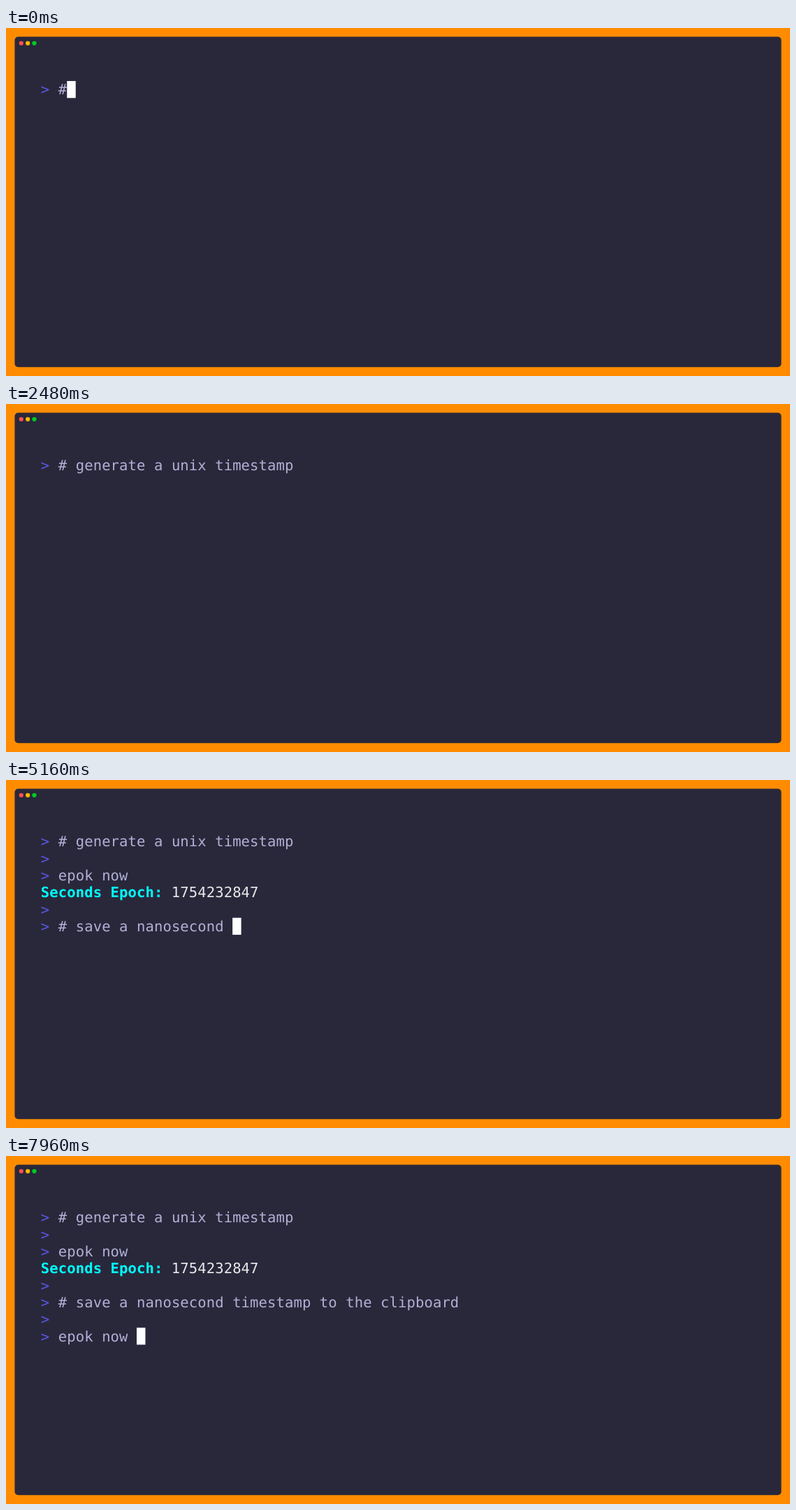
Write an HTML page that moves like this. It is 1122 px wide and 499 px high and loops after 8 s.

```html
<!DOCTYPE html>
<html lang="en">
<head>
<meta charset="utf-8">
<title>Terminal</title>
<style>
  html, body { margin: 0; width: 100%; height: 100%; overflow: hidden; background: #ff8c00; }
  svg { display: block; width: 1122px; height: 499px; }
  text {
    font: 33px "DejaVu Sans Mono", monospace;
    letter-spacing: 0.134px;
    white-space: pre;
    text-rendering: geometricPrecision;
    fill: #b3b0d6;
  }
  .prompt { fill: #5b56e0; }
  .label { fill: #00ffff; font-weight: bold; }
  .value { fill: #e8e8e8; }
</style>
</head>
<body>
<svg viewBox="0 0 1800 800" preserveAspectRatio="xMinYMin meet">
  <rect x="20" y="20" width="1760" height="760" rx="8" fill="#29283b"/>
  <circle cx="35" cy="35" r="5" fill="#ff4f4d"/>
  <circle cx="50" cy="35" r="5" fill="#febb00"/>
  <circle cx="65" cy="35" r="5" fill="#00cc1d"/>
  <g id="screen"></g>
  <rect id="cursor" width="20" height="39" fill="#fff"/>
</svg>
<script>
const LOOP = 8000, TICK = 40;
const CELL = 20, LINE = 39, LEFT = 80, TOP = 122, BASELINE = 31;
const screen = document.getElementById('screen');
const cursor = document.getElementById('cursor');
const snap = ms => Math.ceil(ms / TICK - 1e-6) * TICK;

// open: cursor enters the row; ready: its prompt or output appears; key(n): time of the nth character
const rows = [
  { open: 0, text: '# generate a unix timestamp', key: n => n < 2 ? 0 : 80 + snap((n - 2) * 56) },
  { open: 2520 },
  { open: 2600, text: 'epok now', key: n => 2520 + snap((n + 1) * 520 / 9) },
  { open: 4080, ready: 4120, output: ['Seconds Epoch:', '1754232847'] },
  { open: 4120 },
  { open: 4160, text: '# save a nanosecond timestamp to the clipboard',
    key: n => Math.max(4160 + n * TICK, snap(4098.8 + n * 50.6)) },
  { open: 7440, ready: 7480 },
  { open: 7520, text: 'epok now ', key: n => 7560 + snap((n - 1) * 50) }
];

// Idle spans in which the cursor is hidden
const hidden = [
  [1680, 1880], [2080, 2280], [2480, 2520],
  [3240, 3440], [3640, 3840], [4040, 4080],
  [6640, 6840], [7000, 7200], [7400, 7440]
];

function addText(row, col, content, className = '') {
  const el = document.createElementNS('http://www.w3.org/2000/svg', 'text');
  el.setAttribute('x', LEFT + col * CELL);
  el.setAttribute('y', TOP + row * LINE + BASELINE);
  el.setAttribute('class', className);
  el.textContent = content;
  screen.append(el);
  return el;
}

rows.forEach((row, i) => {
  row.ready ??= row.open;
  row.text ??= '';
  if (row.output) {
    const [label, value] = row.output;
    row.fixed = [addText(i, 0, label, 'label'), addText(i, label.length + 1, value, 'value')];
  } else {
    row.fixed = [addText(i, 0, '>', 'prompt')];
    row.typed = addText(i, 2, '');
  }
});

function typedCount(row, t) {
  let n = 0;
  while (n < row.text.length && row.key(n + 1) <= t) n++;
  return n;
}

function render(t) {
  rows.forEach((row, i) => {
    const ready = t >= row.ready;
    const count = typedCount(row, t);
    for (const el of row.fixed) el.style.display = ready ? '' : 'none';
    if (row.typed) row.typed.textContent = row.text.slice(0, count);
    if (t >= row.open) {
      cursor.setAttribute('x', LEFT + (ready ? 2 + count : 0) * CELL);
      cursor.setAttribute('y', TOP + i * LINE);
    }
  });
  const off = hidden.some(([from, to]) => t >= from && t < to);
  cursor.style.display = off ? 'none' : '';
}

const start = performance.now();
function frame() {
  render((performance.now() - start) % LOOP);
  requestAnimationFrame(frame);
}
frame();
</script>
</body>
</html>
```
